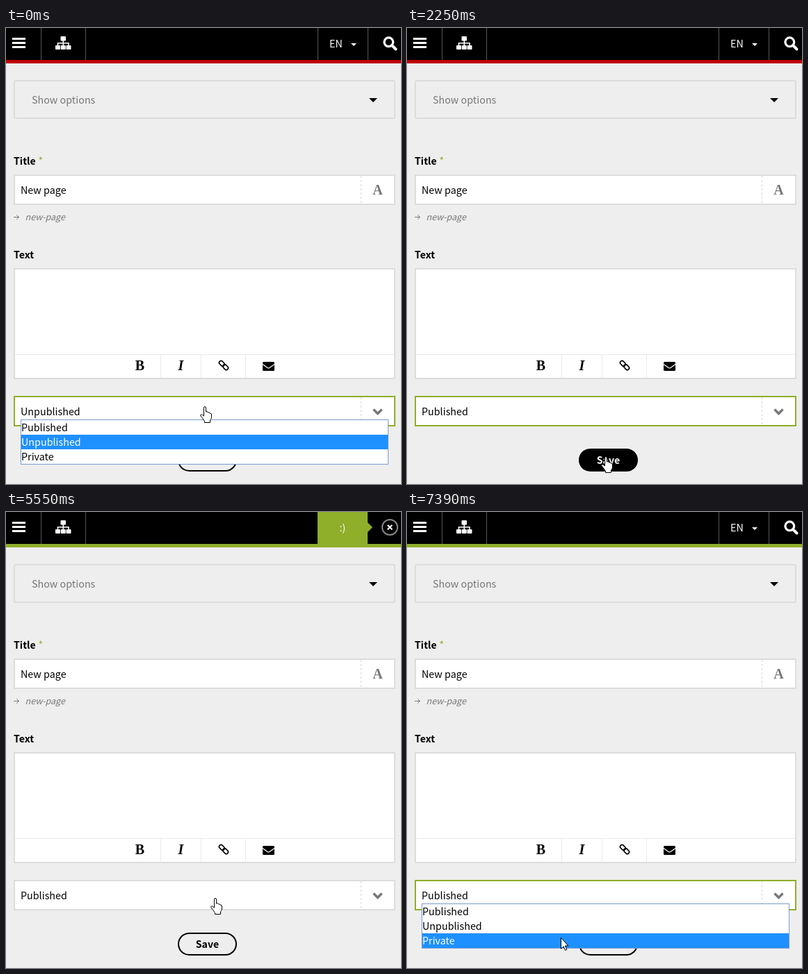
An HTML page for the animation above (8 s loop, 568 px wide and 657 px high).

```html
<!DOCTYPE html>
<html lang="en">
<head>
<meta charset="utf-8">
<title>Page form</title>
<style>
  html, body { margin: 0; height: 100%; overflow: hidden; background: #eee; }
  svg { display: block; width: 568px; height: 657px; }
  text { font: 14.33px "Noto Sans CJK JP", "Noto Sans CJK SC", "Noto Sans CJK KR", "Noto Sans CJK", "Open Sans", sans-serif; white-space: pre; }
  .bold { font-weight: 600; font-size: 14.15px; }
  .serif { font: bold 20px "Liberation Serif", serif; }
  .mid { text-anchor: middle; }
  .field { fill: #fff; stroke: #dcdcdc; stroke-width: 2; }
  .dash { stroke: #d8d8d8; stroke-dasharray: 3 3; }
  .line { fill: none; stroke-linecap: round; stroke-linejoin: round; }
</style>
</head>
<body>
<svg viewBox="0 0 568 657">
  <rect width="568" height="657" fill="#eee"/>

  <!-- header -->
  <rect width="568" height="46"/>
  <rect id="bar" y="46" width="568" height="5"/>
  <path d="M50.5 0V46M114.5 0V46M448.5 0V46" stroke="#555"/>
  <path d="M9 14h19v3H9zM9 20h19v3H9zM9 26h19v3H9z" fill="#fff"/>
  <g fill="#fff">
    <rect x="78.5" y="12" width="7.5" height="6.5" rx="1"/>
    <rect x="71" y="25" width="7" height="6" rx="1"/>
    <rect x="78.8" y="25" width="7" height="6" rx="1"/>
    <rect x="86.5" y="25" width="7" height="6" rx="1"/>
    <path d="M74.5 26v-4.3H90V26M82.3 17v9" fill="none" stroke="#fff" stroke-width="1.6"/>
  </g>
  <g id="tools" fill="#fff">
    <path d="M520.5 0V46" stroke="#555"/>
    <text x="465" y="28">EN</text>
    <path d="M496 22h8l-4 4z"/>
    <path d="M555 25l5.5 5.5" class="line" stroke="#fff" stroke-width="4"/>
    <circle cx="550.3" cy="20.3" r="6.4" fill="none" stroke="#fff" stroke-width="3.2"/>
  </g>
  <g id="close" fill="none">
    <circle cx="552" cy="22" r="11" stroke="#858585" stroke-width="2"/>
    <path d="M548.7 18.7l6.6 6.6m0-6.6l-6.6 6.6" stroke="#fff" stroke-width="2"/>
  </g>
  <g id="note">
    <path d="M448 0h72v15l7 7-7 7v17h-72z" fill="#8fae2a"/>
    <text x="484" y="27.5" class="mid" fill="#fff">:)</text>
  </g>

  <!-- form -->
  <rect x="12" y="76" width="547" height="54" rx="2" class="field" style="fill:none"/>
  <text x="37" y="109" fill="#777">Show options</text>
  <path d="M522 101h12l-6 6z"/>

  <text x="11" y="197" class="bold">Title</text>
  <text x="46.5" y="197" fill="#8fae2a">*</text>
  <rect x="12" y="212" width="547" height="42" class="field"/>
  <path d="M510.5 213V253" class="dash"/>
  <text x="21" y="239">New page</text>
  <text x="534.5" y="240" class="serif mid" fill="#777">A</text>
  <path d="M11.5 272.5h7m-3-3l3 3-3 3" class="line" stroke="#777"/>
  <text x="27.5" y="277" fill="#777" style="font-size:12.53px;font-style:italic">new-page</text>

  <text x="11" y="332" class="bold">Text</text>
  <rect x="12" y="347" width="547" height="158" class="field"/>
  <path d="M13 470.5H558M222.5 471V504M280.5 471V504M344.5 471V504" stroke="#eaeaea"/>
  <text x="192.5" y="493" class="serif mid">B</text>
  <text x="251.5" y="493" class="serif mid" font-style="italic" style="font-style:italic">I</text>
  <g transform="translate(313 486) rotate(45)" fill="none" stroke="#000" stroke-width="1.7">
    <rect x="-8" y="-2.7" width="8.6" height="5.4" rx="2.5"/>
    <rect x="-.6" y="-2.7" width="8.6" height="5.4" rx="2.5"/>
  </g>
  <rect x="369" y="481" width="17" height="13" rx="1.5"/>
  <path d="M369 484.5l7 5q1.5 1 3 0l7-5" fill="none" stroke="#fff" stroke-width="1.2"/>

  <rect id="select" x="12" y="531" width="547" height="42" class="field"/>
  <path d="M510.5 532V572" class="dash"/>
  <path d="M528.5 549.5l6 6 6-6" fill="none" stroke="#777" stroke-width="3.4"/>
  <text id="value" x="21" y="558"></text>

  <rect id="save" x="248" y="607" width="83" height="31" rx="15.5" stroke="#000" stroke-width="2"/>
  <text id="label" x="289.5" y="628" class="bold mid">Save</text>

  <g id="list">
    <rect x="21.5" y="564.5" width="528" height="64" fill="#fff" stroke="#7a9ad0"/>
    <rect id="mark" x="22" width="527" height="21" fill="#1e90ff"/>
    <text x="22" y="581">Published</text>
    <text x="22" y="602">Unpublished</text>
    <text x="22" y="623">Private</text>
  </g>

  <g id="cursor" fill="#fff" stroke="#000" stroke-linejoin="round">
    <path id="hand" d="M5.5 14V2.1a1.5 1.5 0 0 1 3 0V8q2.4-1 3 1 2-.6 2.6 1.1 2.4-.4 2.4 1.9v4c0 2-2 3-2 5v2.5H6.5V21.5C5 19 3 16.5 1 14c-1-1.8 1-3 2.5-1.6z"/>
    <path id="arrow" d="M.5 .5V16.3L4.1 12.9 6.5 18.5 8.8 17.5 6.4 12H11z"/>
  </g>
</svg>
<script>
const $ = id => document.getElementById(id);
const set = (id, name, value) => $(id).setAttribute(name, value);
const show = (id, on) => set(id, "visibility", on ? "visible" : "hidden");
const LOOP = 8000, GREEN = "#8fae2a";

// time, left, top, 1 for the hand
const moves = [
  [0, 279, 545, 1], [550, 264, 552, 1], [680, 249, 560, 1],
  [820, 226, 571, 0], [980, 208, 576, 0], [1940, 210, 577, 0],
  [2100, 270, 611, 1], [2250, 279, 617, 1],
  [4750, 296, 593, 0], [4900, 298, 584, 0], [5030, 300, 577, 0],
  [5180, 294, 566, 1], [5300, 293, 561, 1], [5430, 293, 558, 1], [5550, 294, 556, 1],
  [7000, 275, 580, 0], [7130, 245, 599, 0], [7250, 225, 610, 0], [7390, 221, 613, 0]
];
// time, highlighted row
const marks = [[0, 1], [820, 0], [7000, 1], [7250, 2]];
// time, distance of the message from its place
const slides = [[3080, 72], [3230, 30], [3380, 0]];
const at = (steps, t) => steps.findLast(s => s[0] <= t);
const options = [...document.querySelectorAll("#list text")];

function draw(now) {
  const t = now % LOOP;
  const during = (a, b) => t >= a && t < b;

  set("bar", "fill", t < 3080 ? "#bd0005" : GREEN);
  const closable = during(3230, 5980);
  show("tools", !closable);
  show("close", closable);
  show("note", during(3080, 5980));
  const slide = at(slides, t);
  if (slide) set("note", "transform", `translate(${slide[1]})`);

  $("select").style.stroke = during(2650, 6410) ? "" : GREEN;
  $("value").textContent = t < 1690 ? "Unpublished" : "Published";
  const hover = during(2100, 4750);
  set("save", "fill", hover ? "#000" : "#eee");
  set("label", "fill", hover ? "#fff" : "#000");

  show("list", !during(1690, 6410));
  const row = at(marks, t)[1];
  set("mark", "y", 565 + 21 * row);
  options.forEach((o, i) => o.setAttribute("fill", i === row ? "#fff" : "#000"));

  const [, x, y, hand] = at(moves, t);
  set("cursor", "transform", `translate(${x} ${y})`);
  show("hand", hand);
  show("arrow", !hand);
  requestAnimationFrame(draw);
}
draw(0);
</script>
</body>
</html>
```
